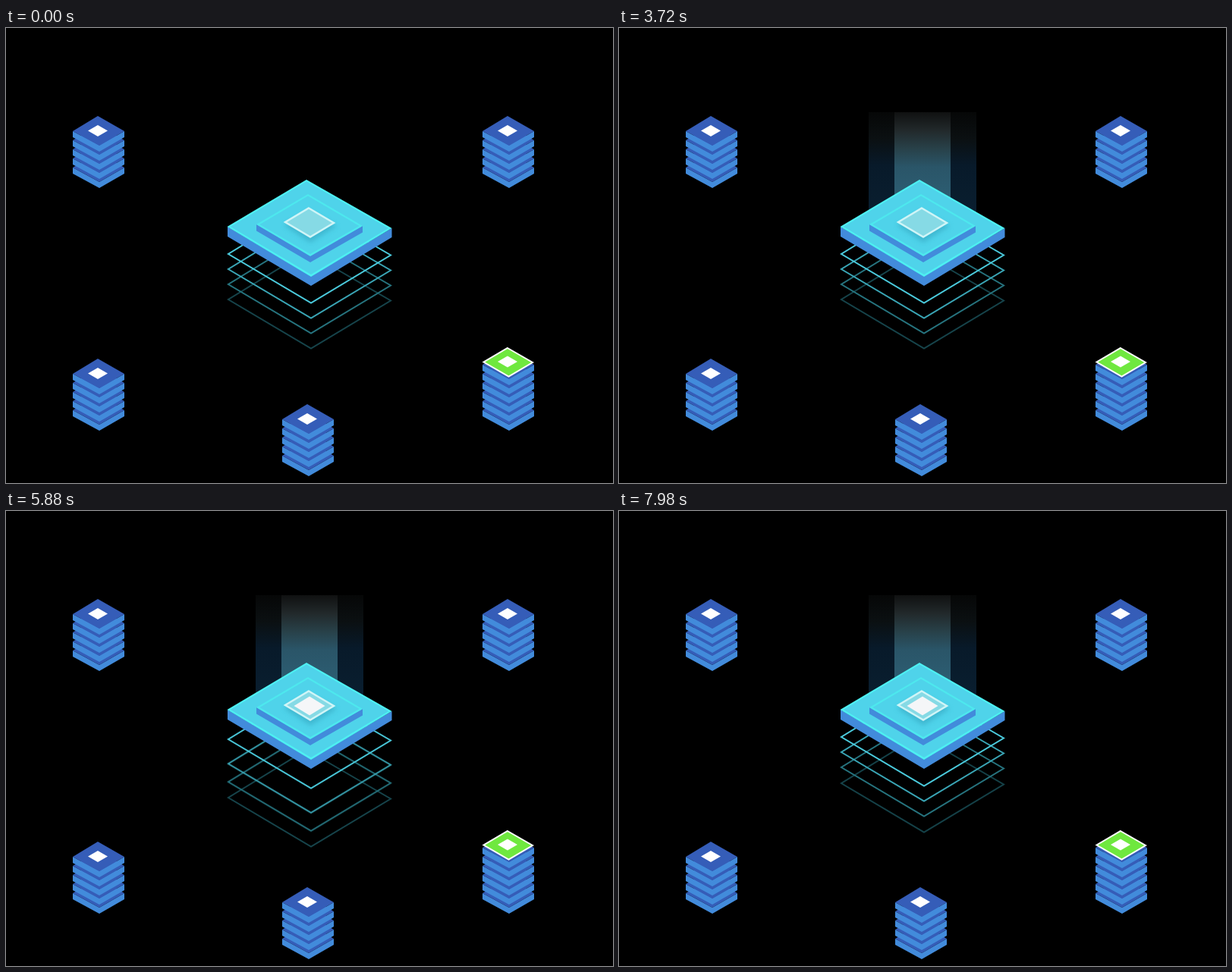
An HTML page for the animation above (8 s loop, 800 px wide and 600 px high).

```html
<!DOCTYPE html>
<html lang="en">
<head>
<meta charset="utf-8">
<title>Isometric stack</title>
<style>
  html, body { margin: 0; width: 100%; height: 100%; overflow: hidden; background: #000; }
  svg { display: block; width: 100%; height: 100%; }

  .side { fill: #428bdb; }
  .face { fill: #355db8; }
  .dot { fill: #fff; }

  .beam, .core { opacity: 0; animation: 8s linear infinite; }
  .outer { animation-name: outer; }
  .inner { animation-name: inner; }
  .core { animation-name: core; }
  @keyframes outer { 0%, 12% { opacity: 0 } 22.2%, 100% { opacity: 1 } }
  @keyframes inner { 0%, 28.2% { opacity: 0 } 37.6%, 100% { opacity: 1 } }
  @keyframes core { 0%, 46.5% { opacity: 0 } 56.3%, 100% { opacity: 1 } }

  .ring { fill: none; stroke-width: 2; animation: 8s cubic-bezier(.37, 0, .63, 1) infinite; }
  .r1 { stroke: #4bcbdd; animation-name: drop1; }
  .r2 { stroke: #3aa6b6; animation-name: drop2; }
  .r3 { stroke: #26747f; animation-name: drop3; }
  .r4 { stroke: #16444b; animation-name: drop4; }
  @keyframes drop1 {
    0%, 46.5% { transform: translateY(0) }
    59% { transform: translateY(20px) }
    78.5%, 100% { transform: translateY(0) }
  }
  @keyframes drop2 {
    0%, 46.5% { transform: translateY(0) }
    67.5% { transform: translateY(20px) }
    86%, 100% { transform: translateY(0) }
  }
  @keyframes drop3 {
    0%, 48.5% { transform: translateY(0) }
    71% { transform: translateY(20px) }
    91%, 100% { transform: translateY(0) }
  }
  @keyframes drop4 {
    0%, 48.5% { transform: translateY(0) }
    74.4% { transform: translateY(20px); animation-timing-function: cubic-bezier(.4, .25, .65, .95) }
    100% { transform: translateY(1px) }
  }
</style>
</head>
<body>
<svg viewBox="0 0 800 600">
  <defs>
    <linearGradient id="outerFill" x1="0" y1="0" x2="0" y2="1">
      <stop offset="0" stop-color="#060707"/>
      <stop offset=".25" stop-color="#0b1012"/>
      <stop offset=".5" stop-color="#081a2a"/>
      <stop offset="1" stop-color="#0a1f30"/>
    </linearGradient>
    <linearGradient id="innerFill" x1="0" y1="0" x2="0" y2="1">
      <stop offset="0" stop-color="#101111"/>
      <stop offset=".2" stop-color="#22292b"/>
      <stop offset=".4" stop-color="#284149"/>
      <stop offset=".6" stop-color="#2a5568"/>
      <stop offset="1" stop-color="#2d5f74"/>
    </linearGradient>
    <filter id="soft" x="-20%" y="-20%" width="140%" height="150%">
      <feGaussianBlur stdDeviation="3"/>
    </filter>

    <g id="slab">
      <path class="side" d="M88 136V144L123 163L156 144V136L123 155Z"/>
      <path class="face" d="M121 116L156 136L123 155L88 136Z"/>
    </g>
    <g id="pile">
      <use href="#slab" y="48"/>
      <use href="#slab" y="36"/>
      <use href="#slab" y="24"/>
      <use href="#slab" y="12"/>
      <use href="#slab"/>
    </g>
    <path id="dot" class="dot" d="M121 128L134 135.5L121 143L108 135.5Z"/>
    <g id="stack">
      <use href="#pile"/>
      <use href="#dot"/>
    </g>
    <path id="ring" d="M396 235L507 299.5L402 362.5L293 298Z"/>
  </defs>

  <rect width="800" height="600" fill="#000"/>

  <use href="#stack"/>
  <use href="#stack" x="540"/>
  <use href="#stack" y="320"/>
  <use href="#stack" x="276" y="380"/>
  <g>
    <use href="#pile" x="540" y="320"/>
    <use href="#slab" x="540" y="308"/>
    <path d="M661 422L694 441L662.5 459.5L629.5 440.5Z" fill="#6fe83f" stroke="#fff" stroke-width="2"/>
    <use href="#dot" x="540" y="304.5"/>
  </g>

  <g class="ring r4"><use href="#ring" y="60"/></g>
  <g class="ring r3"><use href="#ring" y="40"/></g>
  <g class="ring r2"><use href="#ring" y="20"/></g>
  <g class="ring r1"><use href="#ring"/></g>

  <rect class="beam outer" x="329" y="111" width="142" height="140" fill="url(#outerFill)"/>
  <rect class="beam inner" x="363" y="111" width="74" height="120" fill="url(#innerFill)"/>

  <path class="side" d="M292 262V275L402 340L508.500 276V264L402 327Z"/>
  <path d="M396 200L508.500 264L402 328L291.500 262Z" fill="#4df0f2"/>
  <path d="M396 202.500L504 264L402 325L296 262Z" fill="#4fd3ea"/>

  <path class="side" d="M330 259V267.500L401 309L470 269.500V261L401 300Z"/>
  <path d="M398 219L470 261L401 301L330 259Z" fill="#4de8ee"/>
  <path d="M398 221.500L465.500 261L401 298L334.500 259Z" fill="#4fd3ea"/>

  <path d="M400 243L436 261L401 283L366 260Z" fill="#2f9db8" opacity=".5" filter="url(#soft)"/>
  <path d="M399 237.500L432 257L401 275.500L368 256Z" fill="#86dae5" stroke="#d0f5f7" stroke-width="2.500"/>
  <path class="core" d="M400 244.500L420.500 257L400 269.500L379.500 257Z" fill="#f5f6f8"/>
</svg>
</body>
</html>
```
